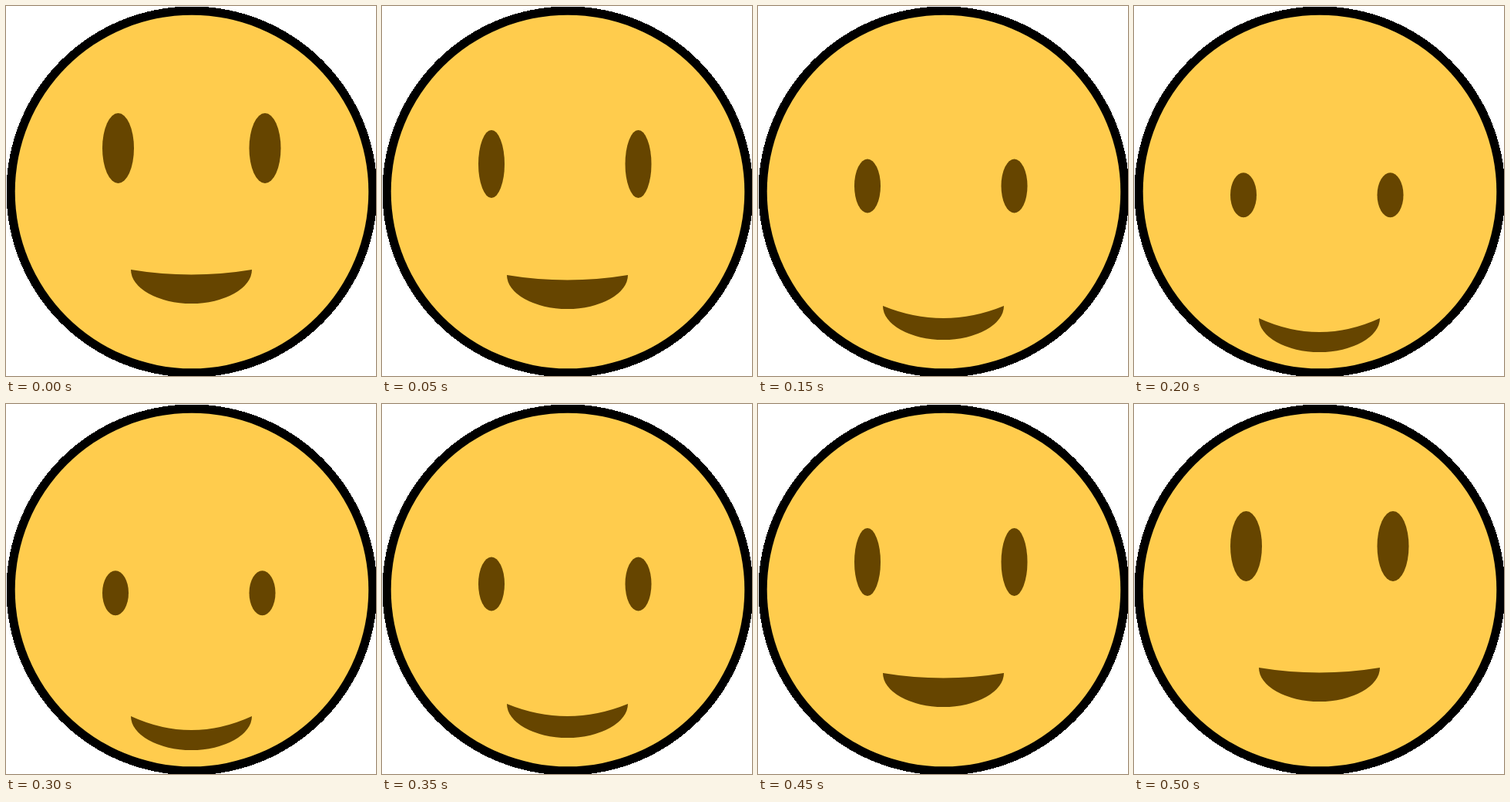
Write an HTML page that moves like this. It is 480x480 px and loops after 550 ms.

```html
<!DOCTYPE html>
<html lang="en">
<head>
<meta charset="utf-8">
<title>Nodding smiley</title>
<style>
  html, body { margin: 0; height: 100%; overflow: hidden; background: #fff; }
  svg { display: block; width: 480px; height: 480px; }
</style>
</head>
<body>
<svg viewBox="0 0 480 480">
  <circle cx="241" cy="241" r="240.5" shape-rendering="crispEdges"/>
  <circle cx="241" cy="241" r="229.3" fill="#ffcc4d"/>
  <g fill="#664500">
    <ellipse class="eye"/>
    <ellipse class="eye"/>
    <path id="mouth"/>
  </g>
</svg>
<script>
const STEP = 50, STEPS = 11;
const eyes = document.querySelectorAll('.eye');
const mouth = document.getElementById('mouth');

// Nod from upright to lowest; the way back mirrors it.
const poses = [
  // eye centre y, eye radius x, eye radius y, mouth corner y, lip dip
  [184.5, 20.5, 45.5, 342, 6.5],
  [205, 17, 44, 349, 6.5],
  [220, 17, 40, 371, 13],
  [233.5, 17, 35, 389, 16],
  [245.2, 17, 29, 405, 18],
  [249, 17, 26, 411, 19],
];

function draw(time) {
  const step = Math.floor(time / STEP) % STEPS;
  const [eyeY, rx, ry, mouthY, dip] = poses[Math.min(step, STEPS - 1 - step)];
  eyes.forEach((eye, i) => {
    const attrs = { cx: 125 + 190.5 * i + rx, cy: eyeY, rx, ry };
    for (const name in attrs) eye.setAttribute(name, attrs[name]);
  });
  mouth.setAttribute('d',
    `M162 ${mouthY}Q240.5 ${mouthY + 2 * dip} 319 ${mouthY}A78.5 44 0 0 1 162 ${mouthY}Z`);
}

const start = performance.now();
function loop() {
  draw(performance.now() - start);
  requestAnimationFrame(loop);
}
loop();
</script>
</body>
</html>
```
